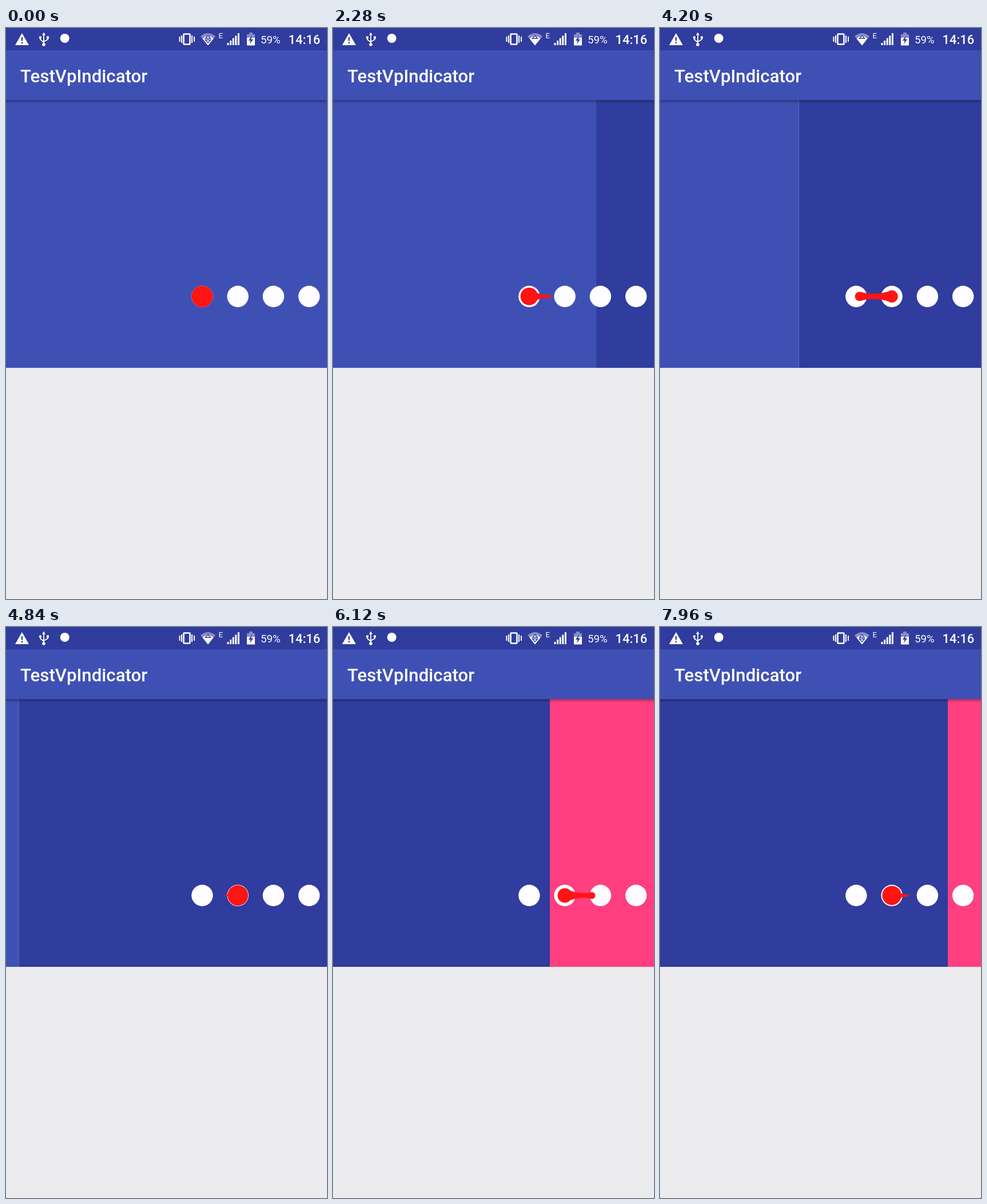
Animation, 561 px wide and 998 px high, one loop 8000 ms. Source, as an HTML page:

```html
<!DOCTYPE html>
<html lang="en">
<head>
<meta charset="utf-8">
<title>Pager indicator</title>
<style>
  html, body { margin: 0; width: 100%; height: 100%; overflow: hidden; background: #ecebee; }
  svg { display: block; width: 100vw; height: 100vh; }
  text { font-family: Roboto, "Noto Sans", sans-serif; fill: #fff; }
  .medium { font-weight: 500; }
</style>
</head>
<body>
<svg viewBox="0 0 561 998">
  <defs>
    <linearGradient id="shade" x2="0" y2="1">
      <stop offset="0" stop-color="#000" stop-opacity=".3"/>
      <stop offset="1" stop-color="#000" stop-opacity="0"/>
    </linearGradient>
  </defs>
  <rect width="561" height="998" fill="#ecebee"/>

  <g id="pages">
    <rect y="126" width="561" height="468" fill="#3f50b5"/>
    <rect x="561" y="126" width="561" height="468" fill="#303c9e"/>
    <rect x="1122" y="126" width="561" height="468" fill="#ff3f7f"/>
  </g>

  <rect y="39" width="561" height="87" fill="#3f50b5"/>
  <rect y="126" width="561" height="6" fill="url(#shade)"/>
  <text class="medium" x="25" y="95" font-size="31.2">TestVpIndicator</text>

  <rect width="561" height="39" fill="#303c9e"/>
  <g fill="#fff">
    <path d="M28 9 40 30H16Z"/>
    <path d="M26.8 16h2.4v6.5h-2.4zm0 8.5h2.4v2.5h-2.4z" fill="#303c9e"/>

    <path d="M66 11V28M60 17v3l6 5M73 17v3l-7 4" fill="none" stroke="#fff" stroke-width="1.8"/>
    <path d="M66 7.5 69 12.5H63ZM71 14.5h4v4h-4z"/>
    <circle cx="66" cy="29" r="2.8"/>
    <circle cx="60" cy="16.5" r="2.2"/>

    <circle cx="102.7" cy="18" r="8"/>

    <rect x="310.5" y="10.5" width="11" height="18" rx="1" fill="none" stroke="#fff" stroke-width="2.6"/>
    <path d="M302.5 15h2v9h-2zm3.5-2h2v13h-2zm18 0h2v13h-2zm4 2h2v9h-2z"/>

    <path d="M340 14.5Q353 3.5 366 14.5L353 30.5Z" opacity=".42"/>
    <path d="M343.5 18.5Q353 10 362.5 18.5L353 30.5Z"/>
    <g stroke="#303c9e" stroke-width="1.4">
      <path d="M348.5 18.3 353 13.2 357.5 18.3Z"/>
      <path id="down" d="M348.5 20.8 353 25.9 357.5 20.8Z"/>
    </g>
    <text x="371.5" y="18" font-size="13.5">E</text>

    <path d="M386.5 26h3v4h-3zm4.6-4h3v8h-3zm4.6-4.3h3v12.3h-3zm4.6-4.2h3v16.5h-3zm4.6-4.5h3v21h-3z"/>

    <path d="M425 8h6v3h4v6h-14v-6h4z" opacity=".42"/>
    <path d="M421 17h14v13.5h-14z"/>
    <path d="M430 13.5 423.8 22h3.7l-1.3 6 6-8.3h-3.7z" fill="#303c9e"/>
  </g>
  <text x="445" y="27" font-size="18.7">59%</text>
  <text class="medium" x="493.5" y="28" font-size="21.9">14:16</text>

  <g id="dots" fill="#fffdff"></g>
  <path id="blob" fill="#ff1414"/>
</svg>
<script>
  const LOOP = 8000, STEP = 40, WIDTH = 561;
  const FIRST = 342.9, GAP = 62.25, ROW = 469.2, R = 18.7;
  const FLING = 4680, SETTLED = 5180;

  // Finger track: [time in ms, scroll offset in px]
  const track = [
    [0, 0], [1160, 0], [1440, 94], [1860, 230], [2280, 101], [2720, 0],
    [3000, 0], [3360, 143], [3800, 250], [FLING, 404], [SETTLED, 561],
    [5680, 561], [6120, 743], [6480, 771], [6840, 771], [7640, 611],
    [7960, 619], [LOOP, 619]
  ];

  const $ = id => document.getElementById(id);
  const pages = $("pages"), blob = $("blob"), down = $("down");

  for (let i = 0; i < 4; i++) {
    const dot = document.createElementNS("http://www.w3.org/2000/svg", "circle");
    dot.setAttribute("cx", FIRST + i * GAP);
    dot.setAttribute("cy", ROW);
    dot.setAttribute("r", R);
    $("dots").append(dot);
  }

  const slope = i => (track[i + 1][1] - track[i][1]) / (track[i + 1][0] - track[i][0]);

  // Tangents that never overshoot the track points
  function tangent(i) {
    if (i === 0 || i === track.length - 1) return 0;
    const a = slope(i - 1), b = slope(i);
    return a * b > 0 ? 2 * a * b / (a + b) : 0;
  }

  function scrollAt(t) {
    let i = 0;
    while (i < track.length - 2 && t >= track[i + 1][0]) i++;
    const [t0, a] = track[i], [t1, b] = track[i + 1];
    const span = t1 - t0, u = (t - t0) / span;
    if (t0 === FLING) return b + (a - b) * (1 - u) ** 5;
    const v = 1 - u;
    return a * v * v * (1 + 2 * u) + b * u * u * (3 - 2 * u)
      + span * u * v * (tangent(i) * v - tangent(i + 1) * u);
  }

  const circle = (x, r) =>
    `M${x - r} ${ROW}a${r} ${r} 0 1 1 ${2 * r} 0a${r} ${r} 0 1 1 ${-2 * r} 0Z`;

  // How far the smaller end sits from the larger one
  const reach = p => 19.3 + (GAP - 19.3) * Math.min(1, 2 * p);

  function blobPath(pos) {
    const page = Math.floor(pos), p = pos - page;
    const left = FIRST + page * GAP, right = left + GAP;
    if (p < 0.002) return circle(left, R);
    const x1 = p > 0.5 ? right - reach(1 - p) : left;
    const x2 = p > 0.5 ? right : left + reach(p);
    const r1 = R * (1 - p), r2 = R * p, mid = (x1 + x2) / 2;
    return circle(x1, r1) + circle(x2, r2)
      + `M${x1} ${ROW - r1}Q${mid} ${ROW} ${x2} ${ROW - r2}`
      + `V${ROW + r2}Q${mid} ${ROW} ${x1} ${ROW + r1}Z`;
  }

  function draw(now) {
    const t = Math.floor((now % LOOP) / STEP) * STEP;
    const scroll = scrollAt(t);
    pages.setAttribute("transform", `translate(${-scroll})`);
    blob.setAttribute("d", blobPath(scroll / WIDTH));
    const upOnly = t >= 2100 && t < 5100 && Math.floor((t - 2100) / 1000) % 2 === 0;
    down.setAttribute("visibility", upOnly ? "hidden" : "visible");
  }

  const start = performance.now();
  function tick() {
    draw(performance.now() - start);
    requestAnimationFrame(tick);
  }
  tick();
</script>
</body>
</html>
```
